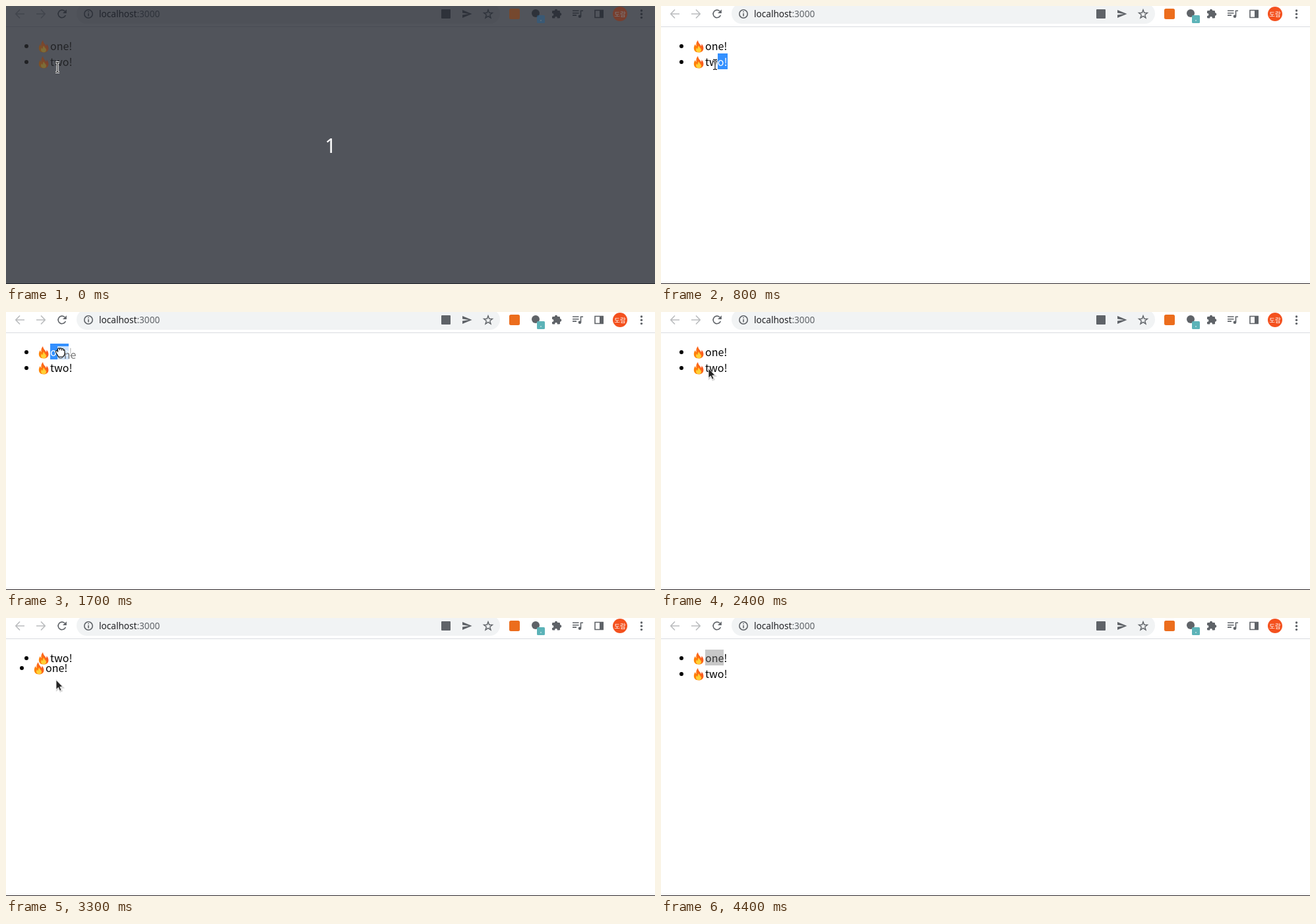
An HTML page that plays this animation: 984 by 422 pixels, repeating every 4.5 s.

```html
<!DOCTYPE html>
<html lang="en">
<head>
<meta charset="utf-8">
<title>Drag to reorder</title>
<style>
  html, body { margin: 0; width: 100%; height: 100%; overflow: hidden; background: #fff; }
  svg { display: block; width: 984px; height: 422px; }
  text { font: 16px 'Noto Sans CJK KR', 'Noto Sans CJK JP', 'Noto Sans CJK', 'Noto Sans', sans-serif; }
  .ui { font-family: 'Noto Sans', sans-serif; }
  .line { fill: none; stroke: #5f6368; stroke-width: 1.6; }
  .dimmed { filter: brightness(.6); opacity: .6; }
</style>
</head>
<body>
<svg viewBox="0 0 984 422">
  <defs>
    <linearGradient id="fire" x1="0" y1="1" x2="1" y2="0.2">
      <stop offset="0" stop-color="#ff8f00"/>
      <stop offset="0.5" stop-color="#ff7411"/>
      <stop offset="1" stop-color="#f4432c"/>
    </linearGradient>
    <g id="item">
      <circle cx="-17" r="3"/>
      <path fill="url(#fire)" d="M8-9C8.500-4 12-3 12.800 0Q13.800-1.500 13.500-3.500C18 1 18 9.500 9 9.500C4 9.500 1 6 2 1Q2.500-1.500 4-3Q4-1 5.500 0C4.800-4 6-7 8-9z"/>
      <path fill="#ffd036" d="M9.500-1C9.500 2 13 3 13 6Q12.500 9.300 9.300 9.300C5 9.300 4 5 6.300 2.300Q6.500 4 7.700 4Q7.500 1 9.500-1z"/>
    </g>
    <path id="beamLine" fill="none" d="M-3-7.500H-1L0-6.500 1-7.500H3M0-6.500V6.500M-3 7.500H-1L0 6.500 1 7.500H3"/>
    <path id="pointer" d="M0 0V14.500L3.400 11.400 5.600 16.500 8 15.500 5.800 10.500H10z"/>
    <path id="back" class="line" style="stroke:#babcbe" d="M28 12H15M21 5.500L14.800 12 21 18.500"/>
  </defs>

  <!-- Browser bar -->
  <rect width="984" height="422" fill="#fff"/>
  <rect x="107" y="-4" width="642" height="31" rx="15.500" fill="#f1f3f4"/>
  <rect y="31" width="984" height="1" fill="#dadce0"/>
  <use href="#back"/>
  <use href="#back" transform="translate(74) scale(-1 1)"/>
  <g class="line">
    <path d="M90.300 14A5.800 5.800 0 1 1 89 7.800"/>
    <circle cx="125" cy="12" r="6.200"/>
    <path d="M125 11v4.500M125 8v1.500"/>
    <polygon id="star" stroke-width="1.400"/>
    <path d="M859 7.300h9.500M859 10.700h9.500M859 14.100h6M871.500 15.500V7.300H875"/>
    <path d="M893 6.500h12v11h-12z"/>
  </g>
  <g id="icons" fill="#5f6368">
    <path d="M91.800 5.200v5.800H86z"/>
    <rect x="660" y="5" width="14" height="14" rx="1"/>
    <path d="M692 18L706.500 12 692 6v4.600l10 1.400-10 1.400z"/>
    <circle cx="803" cy="11" r="6"/>
    <rect x="828" y="7" width="12" height="11.500" rx="1.300"/>
    <circle cx="834" cy="7" r="2.200"/>
    <circle cx="840" cy="12.500" r="2.200"/>
    <g fill="#fff"><circle cx="828.500" cy="13" r="1.900"/><circle cx="834" cy="18" r="1.900"/></g>
    <circle cx="870" cy="15.800" r="2.300"/>
    <path d="M900 6h6v12h-6z"/>
  </g>
  <text class="ui" x="141" y="17" style="font-size:13.600px" fill="#202124">localhost<tspan fill="#5f6368">:3000</tspan></text>
  <rect y="421" width="984" height="1" fill="#2b2528"/>

  <rect id="shade" width="984" height="422" fill="rgb(33,37,45)" opacity="0.78"/>

  <g id="page">
    <rect x="763" y="4" width="16" height="16" rx="2.500" fill="#ec6d1d"/>
    <rect id="badge" x="805" y="14" width="12" height="12" rx="1.500"/>
    <circle cx="811" cy="22" r="0.800" fill="#fff"/>
    <circle cx="931" cy="12" r="11" fill="#f4511e"/>
    <text x="931" y="15.500" text-anchor="middle" style="font-size:9.500px" fill="#fff">도람</text>
    <g id="two">
      <rect id="markTwo" x="38" y="-13" width="15" height="24" fill="#3390ff"/>
      <use href="#item"/>
      <text x="19" y="6">tw<tspan id="wordTwo">o!</tspan></text>
    </g>
    <g id="one">
      <rect id="markOne" x="19" y="-13" width="28" height="24"/>
      <use href="#item"/>
      <text x="19" y="6"><tspan id="wordOne">one</tspan>!</text>
    </g>
  </g>

  <g id="ghost">
    <rect y="-13" width="28" height="24" fill="#fff" opacity="0.75"/>
    <text y="6" fill="#777">one</text>
  </g>

  <text id="count" class="ui" x="492" y="222.500" text-anchor="middle" style="font-size:30px" fill="#fff">1</text>

  <g id="cursor">
    <g id="beam">
      <use href="#beamLine" stroke="#fff" stroke-width="3.200"/>
      <use href="#beamLine" stroke="#111" stroke-width="1.100"/>
    </g>
    <path id="hand" fill="#fff" stroke="#111" stroke-width="1.200" stroke-linejoin="round" d="M-6 1C-7.500-2-5-3.500-3.500-2V-5Q-2-7-.5-5.500Q1-7 2.500-5Q4.500-6 5.200-4Q7-4 7-2V2Q7 5 4.500 7H-2.500Q-4 4-6 1zM-3.500-2V0M-.5-5.500V-3M2.500-5V-2.500M5.200-4V-2"/>
    <g id="arrow">
      <use href="#pointer" x="0.800" y="1.200" stroke="#000" stroke-width="2" opacity="0.150"/>
      <use href="#pointer" fill="#222" stroke="#fff" stroke-width="0.800"/>
    </g>
  </g>
</svg>
<script>
const LOOP = 4500, STEP = 100;
const $ = id => document.getElementById(id);

// Star outline and menu dots
$('star').setAttribute('points', Array.from({ length: 10 }, (_, i) => {
  const r = i % 2 ? 2.8 : 6.8, a = i * Math.PI / 5;
  return [731 + r * Math.sin(a), 12.6 - r * Math.cos(a)];
}).join(' '));
for (let i = -1; i <= 1; i++)
  $('icons').insertAdjacentHTML('beforeend', `<circle cx="963.5" cy="${12.3 + 5.3 * i}" r="1.7"/>`);

// Progress from 0 to 1 between two times, and shapes built on it
const ramp = (t, a, b) => Math.min(1, Math.max(0, (t - a) / (b - a)));
const smooth = (t, a, b) => { const u = ramp(t, a, b); return u * u * (3 - 2 * u); };
const hump = (t, a, b) => Math.sin(Math.PI * ramp(t, a, b));
const swing = (t, a, b) => {
  const u = ramp(t, a, b);
  return (1 - u) * Math.exp(-u) * Math.sin(2.5 * Math.PI * u);
};

// The dragged row: down, a springy tug, then back up
const rowOne = t => [
  48 + 20 * hump(t, 2400, 2800) + 32 * swing(t, 3000, 3500) + 32 * swing(t, 3600, 4100),
  61 + 31 * smooth(t, 2400, 2800) - 7 * ramp(t, 2800, 3000)
     - 9 * hump(t, 3000, 3600) - 24 * smooth(t, 3600, 3900)
];

function pointer(t, [rowX, rowY]) {
  if (t < 400) return [78, 93];
  if (t < 2400) return [
    82 - 4 * ramp(t, 1700, 1900) - 21 * ramp(t, 2000, 2100),
    81 + 28 * hump(t, 500, 830) - 20 * ramp(t, 1100, 1400)
       + 7 * ramp(t, 1700, 1900) + 5 * ramp(t, 2000, 2100)
  ];
  return [
    72 + 4 * ramp(t, 2800, 3300) + .6 * Math.max(0, rowX - 48),
    51.5 + .56 * rowY - 26 * ramp(t, 3600, 4000)
  ];
}

const place = (id, x, y) => $(id).setAttribute('transform', `translate(${x} ${y})`);
const show = (id, on) => $(id).style.display = on ? '' : 'none';
const fill = (id, color) => $(id).setAttribute('fill', color);

function draw(now) {
  const t = Math.floor(now % LOOP / STEP) * STEP;
  const during = (a, b) => t >= a && t < b;
  const row = rowOne(t), [x, y] = pointer(t, row);

  const counting = t < 100;
  show('shade', counting);
  show('count', counting);
  $('page').setAttribute('class', counting ? 'dimmed' : '');
  fill('badge', counting ? '#4a9de0' : '#5cb3b8');

  place('one', ...row);
  place('two', 48, during(2700, 3800) ? 61 : 85);

  const twoMarked = during(600, 1200);
  show('markTwo', twoMarked);
  fill('wordTwo', twoMarked ? '#fff' : '#000');

  const oneMarked = during(1500, 2400) || during(4300, 4400), faded = t >= 4400;
  show('markOne', oneMarked || faded);
  fill('markOne', faded ? '#c8c8c8' : '#3390ff');
  fill('wordOne', oneMarked ? '#fff' : faded ? '#323232' : '#000');

  show('ghost', during(1600, 2400));
  place('ghost', x - 4, y + 4);

  place('cursor', x, y);
  show('beam', t < 1600 || during(4000, 4400));
  show('hand', during(1600, 2400));
  show('arrow', during(2400, 4000));
}

function tick() {
  draw(performance.now());
  requestAnimationFrame(tick);
}
tick();
</script>
</body>
</html>
```
